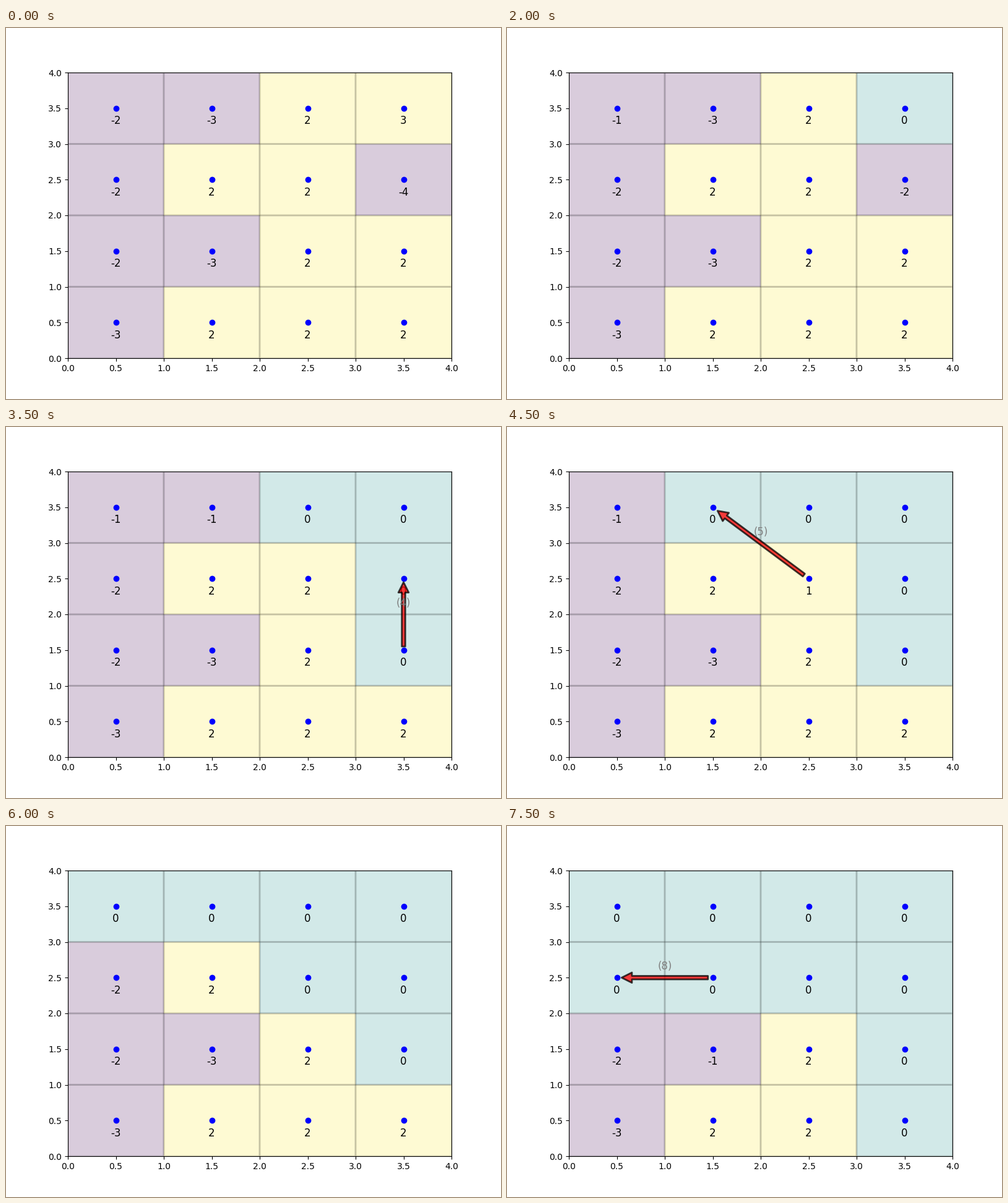
Write a matplotlib script that moves like this. It is 800x600 px and loops after 8 s.

```python
import numpy as np
import matplotlib.pyplot as plt
from matplotlib.animation import FuncAnimation
from matplotlib.colors import ListedColormap
from matplotlib.patches import FancyArrowPatch

N = 4
CAP = 2     # most units one move can carry
GAP = 0.05  # space between an arrow end and a cell centre

# Corner cells (column, row) of each move, from surplus to deficit
ROUTES = [
    [(3, 3), (3, 2)],
    [(3, 3), (0, 3)],
    [(2, 3), (1, 3)],
    [(3, 1), (3, 2)],
    [(2, 2), (1, 3)],
    [(2, 2), (1, 3), (0, 3)],
    [(3, 0), (2, 0), (1, 1)],
    [(1, 2), (0, 2)],
]


def start_grid():
    """Surplus of 2 everywhere except the deficit cells; row 0 is the bottom."""
    grid = np.full((N, N), 2)
    grid[:, 0] = -2
    grid[0, 0] = grid[1::2, 1] = -3
    grid[2, 3] = -4
    grid[3, 3] = 3
    return grid


def balance(steps):
    grid = start_grid()
    for route in ROUTES[:steps]:
        src, dst = route[0][::-1], route[-1][::-1]
        amount = min(grid[src], -grid[dst], CAP)
        grid[src] -= amount
        grid[dst] += amount
    return grid


def hops(route):
    """Yield the centres of neighbouring cells along a route."""
    for a, b in zip(route, route[1:]):
        a, b = np.array(a), np.array(b)
        unit = np.sign(b - a)
        for k in range(abs(b - a).max()):
            yield a + k * unit + 0.5, unit


fig, ax = plt.subplots(figsize=(8, 6), dpi=100)
viridis = plt.get_cmap("viridis")
cmap = ListedColormap([(*viridis(x)[:3], 0.2) for x in (0.0, 0.5, 1.0)])
edges = np.arange(N + 1)
# The tiny shift makes edges on half pixels snap downwards
mesh = ax.pcolor(edges, edges - 1e-6, np.sign(start_grid()), cmap=cmap,
                 vmin=-1, vmax=1, edgecolors=[(0, 0, 0, 0.12)],
                 linewidths=2, antialiased=True)
ticks = np.arange(0, N + 0.5, 0.5)
ax.set(xlim=(0, N), ylim=(0, N), xticks=ticks, yticks=ticks)


def label(x, y, text, rise, color):
    return ax.annotate(text, (x, y), xytext=(0, rise),
                       textcoords="offset points", ha="center",
                       va="baseline", fontsize=12, color=color)


values = {}
for row, col in np.ndindex(N, N):
    x, y = col + 0.5, row + 0.5
    ax.plot(x, y, "bo")
    values[row, col] = label(x, y, "", -18.5, "black")

shown = []


def draw_arrow(start, unit, step):
    tail, tip = start + GAP * unit, start + (1 - GAP) * unit
    arrow = FancyArrowPatch(
        tuple(tail), tuple(tip),
        arrowstyle="simple,head_length=12,head_width=12,tail_width=4",
        mutation_scale=1, shrinkA=0, shrinkB=0,
        facecolor="red", edgecolor="black", linewidth=2,
        alpha=0.75, zorder=3)
    shown.append(ax.add_patch(arrow))
    shown.append(label(*(start + unit / 2), f"({step})", 9.2, "gray"))


def update(i):
    step = (i + 1) // 2
    grid = balance(step)
    mesh.set_array(np.sign(grid))
    for cell, text in values.items():
        text.set_text(str(grid[cell]))
    while shown:
        shown.pop().remove()
    if i % 2:
        for start, unit in hops(ROUTES[step - 1]):
            draw_arrow(start, unit, step)
    return []


anim = FuncAnimation(fig, update, frames=2 * len(ROUTES), interval=500,
                     repeat=True, repeat_delay=0, blit=False)
plt.show()
```
